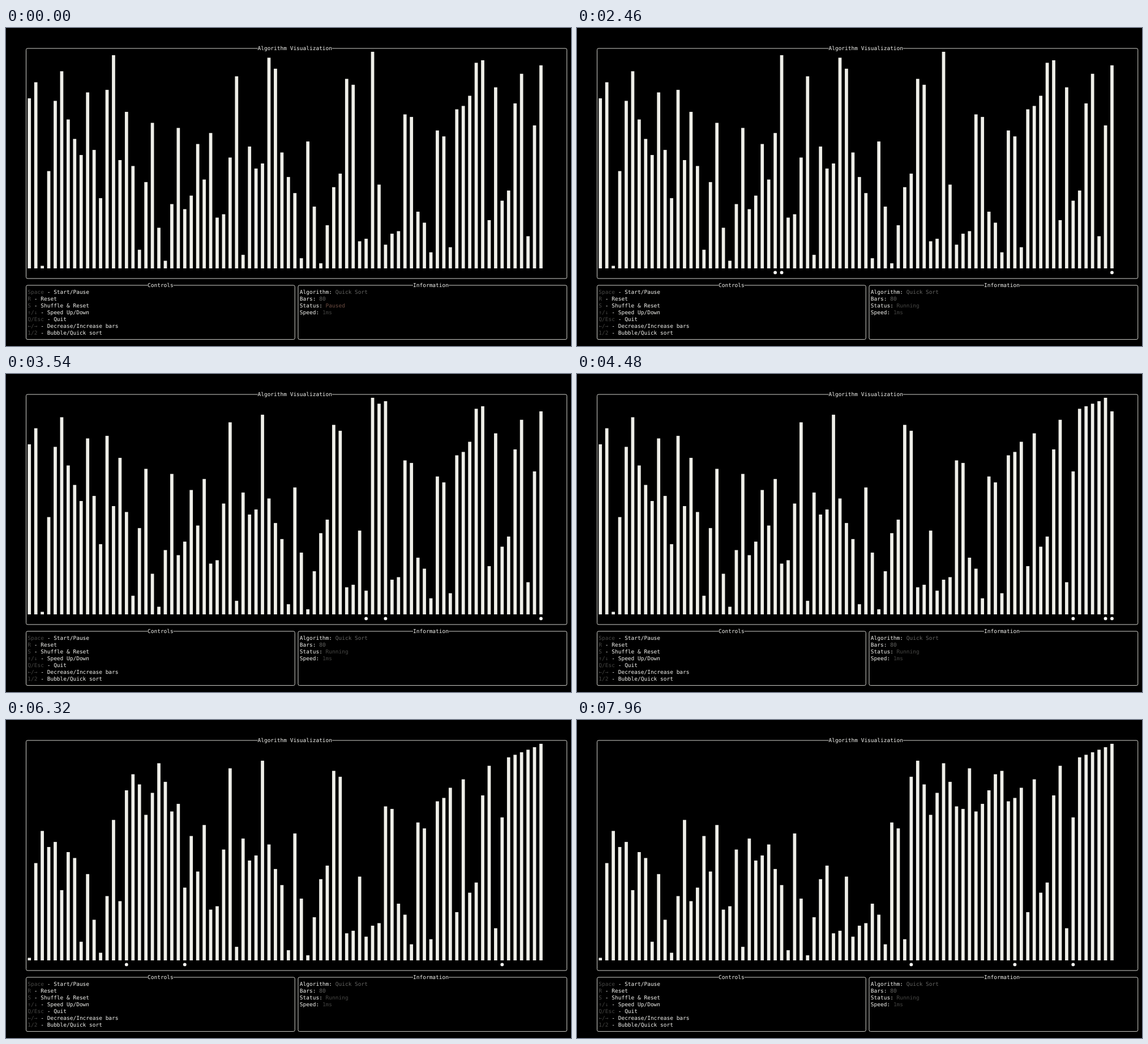
These frames come from a looping animation (998 px wide and 561 px high, 8000 ms). An HTML page:

```html
<!DOCTYPE html>
<html lang="en">
<head>
<meta charset="utf-8">
<title>Algorithm Visualization</title>
<style>
  html, body { margin: 0; width: 100%; height: 100%; overflow: hidden; background: #000; }
  svg { display: block; width: 998px; height: 561px; }
  text {
    font: 9.5px "DejaVu Sans Mono", monospace;
    fill: #f4f4f0;
    white-space: pre;
    text-rendering: geometricPrecision;
  }
  .frame { fill: none; stroke: #d2d2cc; stroke-width: 1; }
  .bar { fill: #eeeee8; }
  .dot { fill: #fafaf6; }
  .key { fill: #464644; }
  .value { fill: #646462; }
  .speed { fill: #424240; }
  .paused { fill: #6c4c42; }
  .running { fill: #484846; }
</style>
</head>
<body>
<svg id="stage" viewBox="0 0 998 561"></svg>
<script>
const LOOP = 8000, TICK = 20;
const STEP = 40.72, FIRST_COMPARE = 1279.6;
const CELL_W = 5.72, CELL_H = 11.94, LEFT = 32.64, TOP = 30.03;

const VALUES = [
  63, 69, 1, 36, 62, 73, 55, 48, 42, 65, 44, 26, 66, 79, 40, 58, 38, 7, 32, 54,
  15, 3, 24, 52, 22, 27, 46, 33, 50, 19, 20, 41, 71, 5, 45, 37, 39, 78, 74, 43,
  34, 28, 4, 47, 23, 2, 16, 30, 35, 70, 68, 10, 11, 80, 31, 9, 13, 14, 57, 56,
  21, 17, 6, 51, 49, 8, 59, 60, 64, 76, 77, 18, 67, 25, 29, 61, 72, 12, 53, 75
];

const stage = document.getElementById('stage');
const colX = col => LEFT + col * CELL_W;
const rowY = row => TOP + row * CELL_H;

function add(tag, attrs, parent = stage, content = '') {
  const node = document.createElementNS('http://www.w3.org/2000/svg', tag);
  for (const name in attrs) node.setAttribute(name, attrs[name]);
  node.textContent = content;
  return parent.appendChild(node);
}

// Each part is [text, class]; parts follow one another on the same line.
function line(col, row, ...parts) {
  const text = add('text', { x: colX(col), y: rowY(row) + 9.25 });
  return parts.map(([content, cls]) => add('tspan', { class: cls || '' }, text, content));
}

function panel(col, row, endCol, endRow, title, titleCol) {
  const x = colX(col + 0.5), y = rowY(row + 0.5);
  add('rect', {
    class: 'frame', x, y, rx: 2.5,
    width: colX(endCol + 0.5) - x, height: rowY(endRow + 0.5) - y
  });
  add('rect', {
    x: colX(titleCol), y: rowY(row), width: title.length * CELL_W, height: CELL_H
  });
  line(titleCol, row, [title]);
}

panel(0, 0, 167, 34, 'Algorithm Visualization', 72);
panel(0, 35, 83, 43, 'Controls', 38);
panel(84, 35, 167, 43, 'Information', 120);

[
  ['Space', 'Start/Pause'], ['R', 'Reset'], ['S', 'Shuffle & Reset'],
  ['↑/↓', 'Speed Up/Down'], ['Q/Esc', 'Quit'],
  ['←/→', 'Decrease/Increase bars'], ['1/2', 'Bubble/Quick sort']
].forEach(([key, action], n) => line(1, 36 + n, [key, 'key'], [' - ' + action]));

line(85, 36, ['Algorithm: '], ['Quick Sort', 'value']);
line(85, 37, ['Bars: '], ['80', 'value']);
const status = line(85, 38, ['Status: '], ['Paused', 'paused'])[1];
line(85, 39, ['Speed: '], ['1ms', 'speed']);

const barCol = index => 1 + 2 * index;
const bars = VALUES.map((_, n) => add('rect', { class: 'bar', x: colX(barCol(n)), width: CELL_W }));
const dots = [0, 1, 2].map(() => add('circle', { class: 'dot', cy: 431.4, r: 2.9 }));

// Quick sort on an explicit stack, right half first, recorded as timed states.
function record() {
  const list = VALUES.slice();
  const states = [{ time: 0, list: VALUES, marks: [], running: false }];
  const stack = [[0, list.length - 1]];
  let time = FIRST_COMPARE - STEP;

  const show = (marks, steps) => {
    states.push({ time, list: list.slice(), marks, running: true });
    time += steps * STEP;
  };
  const swap = (a, b) => { [list[a], list[b]] = [list[b], list[a]]; };

  while (stack.length && time < LOOP) {
    const [low, high] = stack.pop();
    if (low > high) continue;
    if (low === high) { show([high], 0.58); continue; }

    show([high], 1);
    let store = low;
    for (let j = low; j < high; j++) {
      const marks = [store, j, high];
      if (list[j] < list[high]) {
        show(marks, 0.5);
        swap(store++, j);
        show(marks, 0.5);
      } else {
        show(marks, 1);
      }
    }
    swap(store, high);
    show([store, high], 1);
    stack.push([low, store - 1], [store + 1, high]);
  }
  return states;
}

const states = record();
const floor = rowY(33);
let current = null;

function draw(state) {
  state.list.forEach((value, n) => {
    const height = Math.floor(value * 3.2) * CELL_H / 8;
    bars[n].setAttribute('y', floor - height);
    bars[n].setAttribute('height', height);
  });
  dots.forEach((dot, n) => {
    const shown = n < state.marks.length;
    dot.setAttribute('visibility', shown ? 'visible' : 'hidden');
    if (shown) dot.setAttribute('cx', colX(barCol(state.marks[n]) + 0.5));
  });
  status.textContent = state.running ? 'Running' : 'Paused';
  status.setAttribute('class', state.running ? 'running' : 'paused');
}

function update() {
  const time = Math.floor(performance.now() % LOOP / TICK) * TICK;
  const state = states.findLast(s => s.time <= time);
  if (state !== current) draw(current = state);
  requestAnimationFrame(update);
}
update();
</script>
</body>
</html>
```
